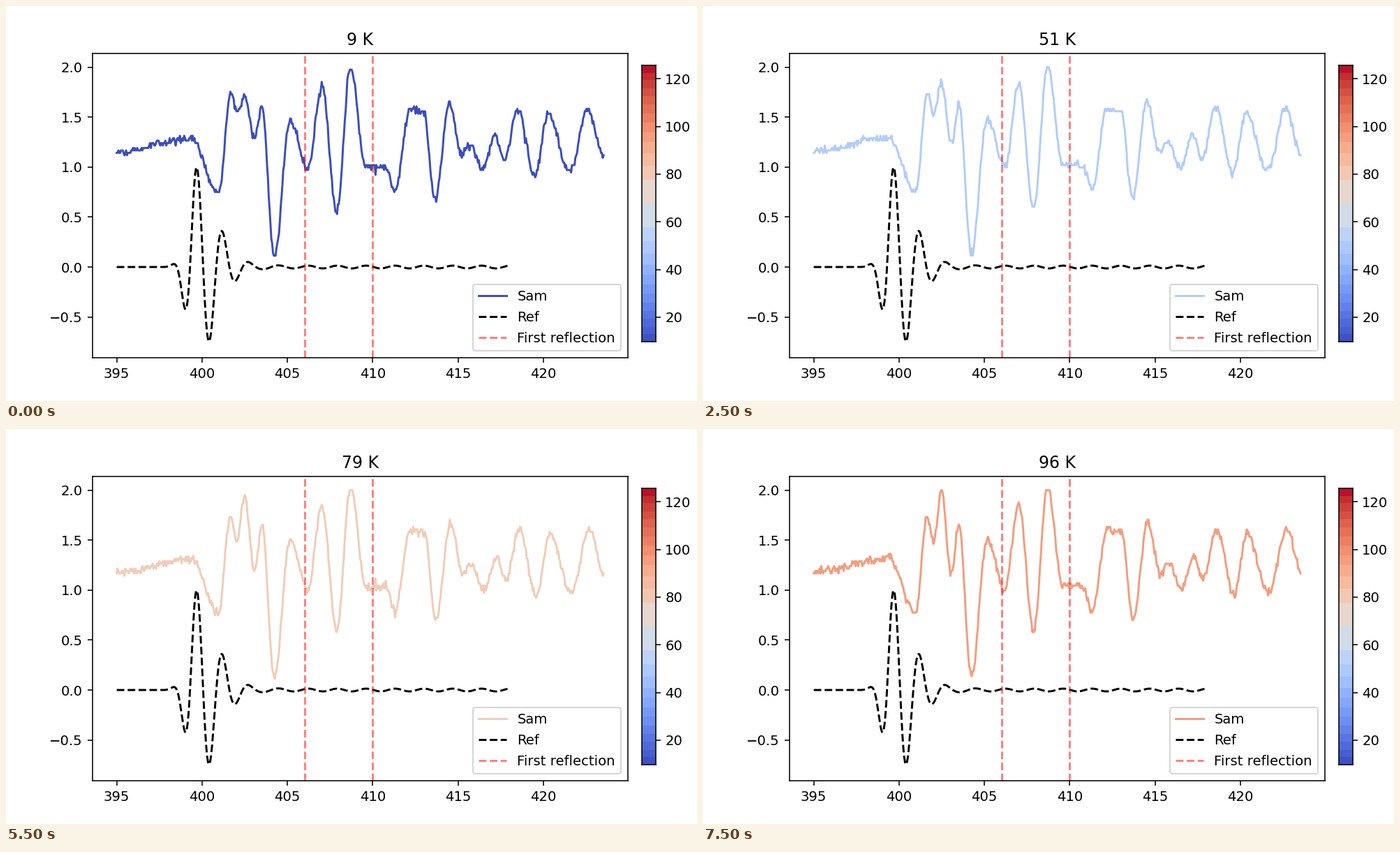
A matplotlib script for the animation above (8000 ms loop, 990x566 px).

```python
import numpy as np
import matplotlib.pyplot as plt
from matplotlib.animation import FuncAnimation

DPI = 141.5
FRAMES = 16
T_MIN, T_MAX = 9.7, 125.7
START, END, REF_END = 395, 423.53, 417.9
STEP = 0.0245  # digitiser resolution

# Turning points of the cold signal: time, level
TURNS = [
    (START, 1.15), (399.4, 1.28), (400.96, 0.735), (401.68, 1.73),
    (402.08, 1.55), (402.48, 1.715), (403.09, 1.30), (403.5, 1.595),
    (404.24, 0.11), (405.15, 1.465), (406.2, 0.985), (407.02, 1.815),
    (407.89, 0.555), (408.7, 2.0), (409.6, 1.01), (410.8, 1.0),
    (411.28, 0.755), (412.2, 1.58), (413.0, 1.54), (413.65, 0.67),
    (414.49, 1.64), (415.2, 1.13), (415.7, 1.23), (416.43, 0.98),
    (417.17, 1.30), (417.7, 1.07), (418.5, 1.58), (419.5, 0.915),
    (420.27, 1.53), (421.54, 0.95), (422.6, 1.575), (END, 1.11),
]


def ease_through(x, points):
    """Half-cosine ease from each point to the next."""
    px, py = np.array(points).T
    i = np.clip(np.searchsorted(px, x) - 1, 0, len(px) - 2)
    s = np.clip((x - px[i]) / (px[i + 1] - px[i]), 0, 1)
    return py[i] + (py[i + 1] - py[i]) * (1 - np.cos(np.pi * s)) / 2


def reference(t):
    """Short pulse with a fast rise, a slow decay and a faint ripple after it."""
    u = t - 399.68
    env = np.where(u < 0, np.exp(-(u / 0.76) ** 2),
                   np.exp(2 - np.sqrt(4 + 2.25 * u ** 2)))
    ripple = 0.014 * np.cos(2 * np.pi * (t - 404.55) / 1.69)
    return env * np.cos(np.pi * u / 0.77) + ripple * np.clip(t - 403, 0, 1)


def sample(k):
    """Signal at step k: warming lifts, delays and sharpens the cold one."""
    warm = (temps[k] - temps[0]) / (temps[-1] - temps[0])
    lag = 0.12 * warm * np.clip((time - 411) / 5, 0, 1)
    u = time - 402.48
    ring = 0.25 * np.cos(2 * np.pi * u / 1.22) * np.exp(-((u - 0.1) / 0.8) ** 2)
    y = ease_through(time - lag, TURNS) + warm * (0.035 + ring)
    y += np.random.default_rng(k).normal(0, 0.02, len(time))
    return np.minimum(2 - STEP * np.round((2 - y) / STEP), 2.0)


def tint(temp):
    return plt.cm.coolwarm((temp - T_MIN) / (T_MAX - T_MIN))


temps = np.interp(range(FRAMES), [0, 3, 5, 9, 11, 13, 15],
                  [9, 39, 51, 70, 79, 87, 96])
time = np.linspace(START, END, 571)
ref_time = np.linspace(START, REF_END, 459)

fig = plt.figure(figsize=(990.01 / DPI, 566.01 / DPI), dpi=DPI)
ax = fig.add_subplot()
sam, = ax.plot(time, sample(0), color=tint(T_MIN), label="Sam")
ax.plot(ref_time, reference(ref_time), "k--", label="Ref")
for x, label in ((406, "First reflection"), (410, None)):
    ax.axvline(x, color="r", ls="--", alpha=0.5, label=label)
margin = 0.05 * (END - START)
ax.set_xlim(START - margin, END + margin)
ax.set_ylim(-0.906, 2.138)
title = ax.set_title("9 K")
legend = ax.legend(loc="lower right", labelspacing=0.55, borderpad=0.42)
key = legend.get_lines()[0]

# Temperature scale, with wider bands near the middle
u = np.linspace(-1, 1, 27)
half = (T_MAX - T_MIN) / 2
edges = T_MIN + half + half * np.sign(u) * np.abs(u) ** 0.69
mids = (edges[:-1] + edges[1:]) / 2
cax = fig.add_axes([0.92, 0.15, 0.02, 0.7])
cax.pcolormesh([0, 1], edges, mids[:, None], cmap="coolwarm",
               vmin=T_MIN, vmax=T_MAX)
cax.set_xlim(0, 1)
cax.set_ylim(T_MIN, T_MAX)
cax.set_xticks([])
cax.set_yticks(range(20, 121, 20))
cax.yaxis.tick_right()
cax.yaxis.set_label_position("right")
cax.set_ylabel("Temperature (K)", labelpad=4.6)


def update(k):
    color = tint(max(temps[k], T_MIN))
    sam.set_ydata(sample(k))
    sam.set_color(color)
    key.set_color(color)
    title.set_text(f"{temps[k]:.0f} K")
    return sam, key, title


anim = FuncAnimation(fig, update, frames=FRAMES, interval=500,
                     repeat=True, repeat_delay=0)
plt.show()
```
